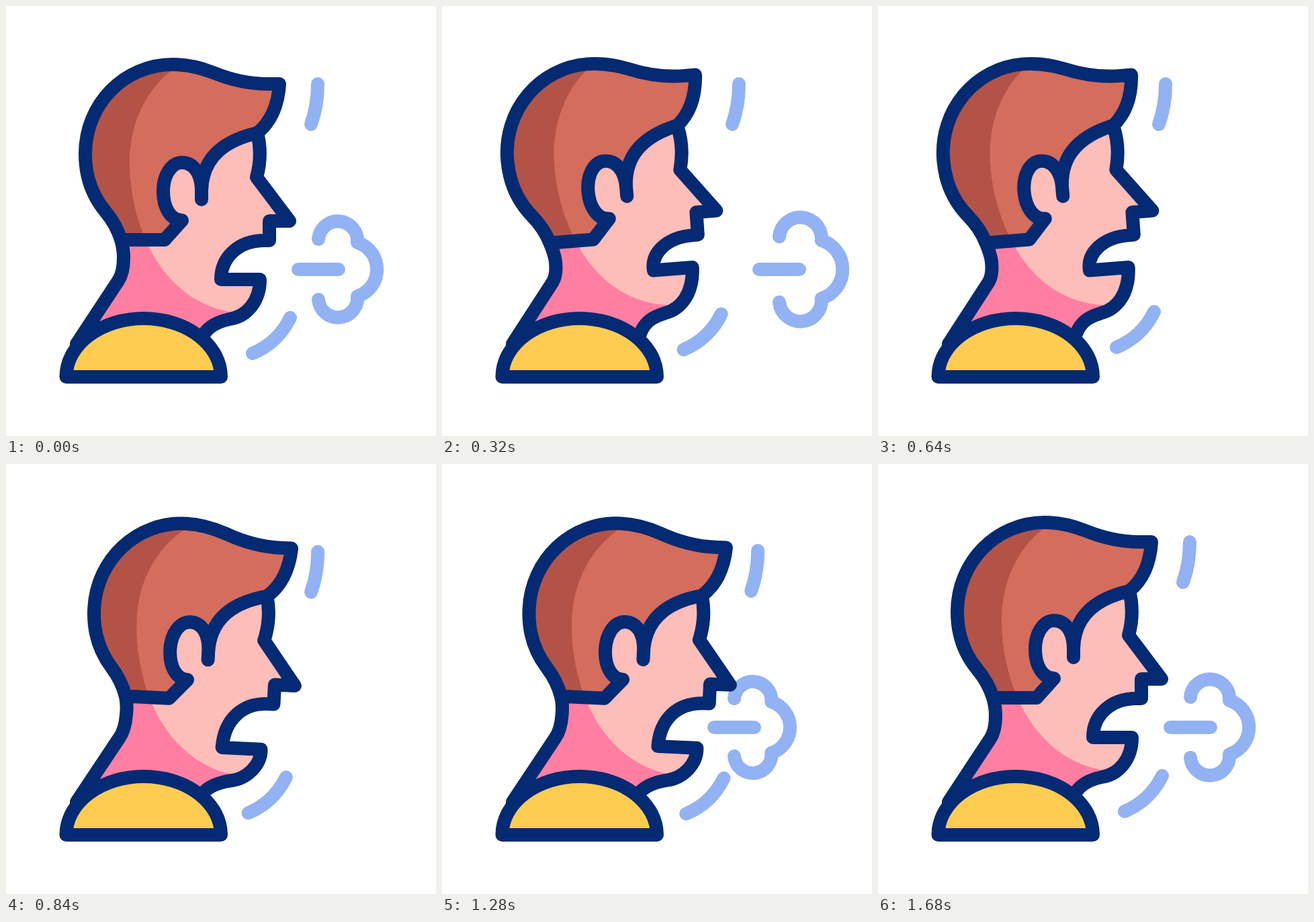
Recreate the animation shown at these times as an HTML page. Size 640 by 640 pixels, loop 1.72 s.

```html
<!DOCTYPE html>
<html lang="en">
<head>
<meta charset="utf-8">
<title>Cough</title>
<style>
  html, body { margin: 0; width: 100%; height: 100%; overflow: hidden; background: #fff; }
  svg { display: block; width: 100vw; height: 100vh; }
  .line { fill: none; stroke: #032a73; stroke-width: 20; stroke-linecap: round; stroke-linejoin: round; }
  .air { stroke: #92b2f4; }
  .air path { vector-effect: non-scaling-stroke; }
</style>
</head>
<body>
<svg viewBox="0 0 640 640">
  <defs>
    <clipPath id="headClip"><path data-shape="head"/></clipPath>
    <clipPath id="hairClip"><path data-shape="hair"/></clipPath>
  </defs>

  <g id="puff" class="line air">
    <path d="M435,392H495"/>
    <path id="cloud" d="M465,347A29,29 0 0 1 523,352A42,42 0 0 1 523,432A29,29 0 0 1 465,437"/>
  </g>
  <g class="line air">
    <path id="arcTop" d="M464,116Q464,148 454,176"/>
    <path id="arcLow" d="M423,464Q405,501 367,517"/>
  </g>

  <path data-shape="head" fill="#fdbdb9"/>
  <g clip-path="url(#headClip)"><path data-shape="shade" fill="#ff7fa2"/></g>
  <path data-shape="hair" fill="#d46d5c"/>
  <g clip-path="url(#hairClip)"><path data-shape="shade" fill="#b35347"/></g>
  <path class="line" data-shape="face"/>
  <path class="line" data-shape="outline"/>
  <path class="line" style="fill:#fdcc50" d="M89.5,552A115.25,87 0 0 1 320,552Z"/>
</svg>
<script>
const LOOP = 1720, STEP = 40;
const $ = id => document.getElementById(id);

// Points are "x,y"; "@w" sets how far a point follows the tilt,
// "j" ties it to the lower jaw and "u" to the upper lip.
const neck = 'M105,503@0 L167,409@.4 C173,400@.5 175,390@.6 175,375@.75 C175,366@.85 174,357 171,348 ';
const scalp = 'C166,331 158,318 148,306 C128,282 118,252 118,220 C118,146 176,87 248,87 ' +
  'C270,87 290,92 308,99 C335,110 360,116 390,116 L407,116 C405,148 395,172 374,189 ';
const fringe = 'C330,199 292,222 291,275 L291,288 L291,275 C291,248 278,233 262,233 ' +
  'C246,233 234,252 234,276 C234,300 245,319 262,319 L236,348 L171,348 ';
const profile = 'C380,213 379,233 373,255 L422,320 L392,320 L392,349u L385,349u ' +
  'C345,349u 320,375 320,407j L378,407j C378,440 358,462 333,466 C314,470 302,477 295,488@0 ';
const shapes = {
  head: neck + scalp + profile + 'L200,520@0 Z',
  hair: 'M171,348 ' + scalp + fringe + 'Z',
  outline: neck + scalp + fringe,
  face: 'M374,189 ' + profile,
  shade: 'M260,85 L245,97 C206,128@.9 184,178@.85 184,232@.85 C184,325@.85 230,440 338,456@1.2 ' +
    'L350,540 L50,540 L50,60 Z'
};

const tiltKeys = [[0, 0], [40, 0], [310, -4.6], [640, -4.6], [890, 3.65], [1040, 3.65], [1680, 0], [LOOP, 0]];
const arcKeys = (back, fore) =>
  [[0, [0, 0]], [40, [0, 0]], [530, back], [640, back], [920, fore], [1060, fore], [1680, [0, 0]], [LOOP, [0, 0]]];
const topKeys = arcKeys([-36, 0], [8.5, 18]);
const lowKeys = arcKeys([-12, -9], [-5, 5]);

const ease = p => (1 - Math.cos(Math.PI * p)) / 2;
const mix = (a, b, p) => Array.isArray(a) ? a.map((v, i) => mix(v, b[i], p)) : a + (b - a) * p;

function sample(keys, t) {
  const i = keys.findIndex(k => k[0] > t);
  const [t0, a] = keys[i - 1], [t1, b] = keys[i];
  return mix(a, b, ease((t - t0) / (t1 - t0)));
}

// Tilts the points of a path around the base of the neck.
function bend(d, deg) {
  const jaw = deg * (deg > 0 ? 3.5 : 1.3);
  const lip = Math.max(0, -deg);
  return d.replace(/([\d.]+),([\d.]+)(?:@([\d.]+))?([ju]?)/g, (_, x, y, w = 1, part) => {
    const turn = w * deg * Math.PI / 180;
    const c = Math.cos(turn), s = Math.sin(turn);
    const dx = x - 224, dy = y - 482;
    const slide = part === 'j' ? jaw * -.2 : 0;
    const drop = part === 'j' ? jaw : part === 'u' ? lip : 0;
    return (224 + dx * c - dy * s + slide).toFixed(2) + ',' + (482 + dx * s + dy * c + drop).toFixed(2);
  });
}

function movePuff(t) {
  const leaving = t < 640, shown = leaving || t >= 960;
  $('puff').style.display = shown ? '' : 'none';
  if (!shown) return;
  const dx = leaving
    ? 37 * (Math.max(0, t - 40) / 280) ** 2.4
    : -119 * (Math.max(0, 1680 - t) / 600) ** 3.4;
  const scale = 1 + dx * (leaving ? .0022 : .0016);
  $('puff').setAttribute('transform', `translate(${dx})`);
  $('cloud').setAttribute('transform', `translate(465 392) scale(${scale}) translate(-465 -392)`);
}

function draw(t) {
  const deg = sample(tiltKeys, t);
  for (const el of document.querySelectorAll('[data-shape]'))
    el.setAttribute('d', bend(shapes[el.dataset.shape], deg));
  $('arcTop').setAttribute('transform', `translate(${sample(topKeys, t)})`);
  $('arcLow').setAttribute('transform', `translate(${sample(lowKeys, t)})`);
  movePuff(t);
}

const start = performance.now();
function tick(now) {
  const t = Math.max(0, now - start) % LOOP;
  draw(Math.floor(t / STEP) * STEP);
  requestAnimationFrame(tick);
}
draw(0);
requestAnimationFrame(tick);
</script>
</body>
</html>
```
